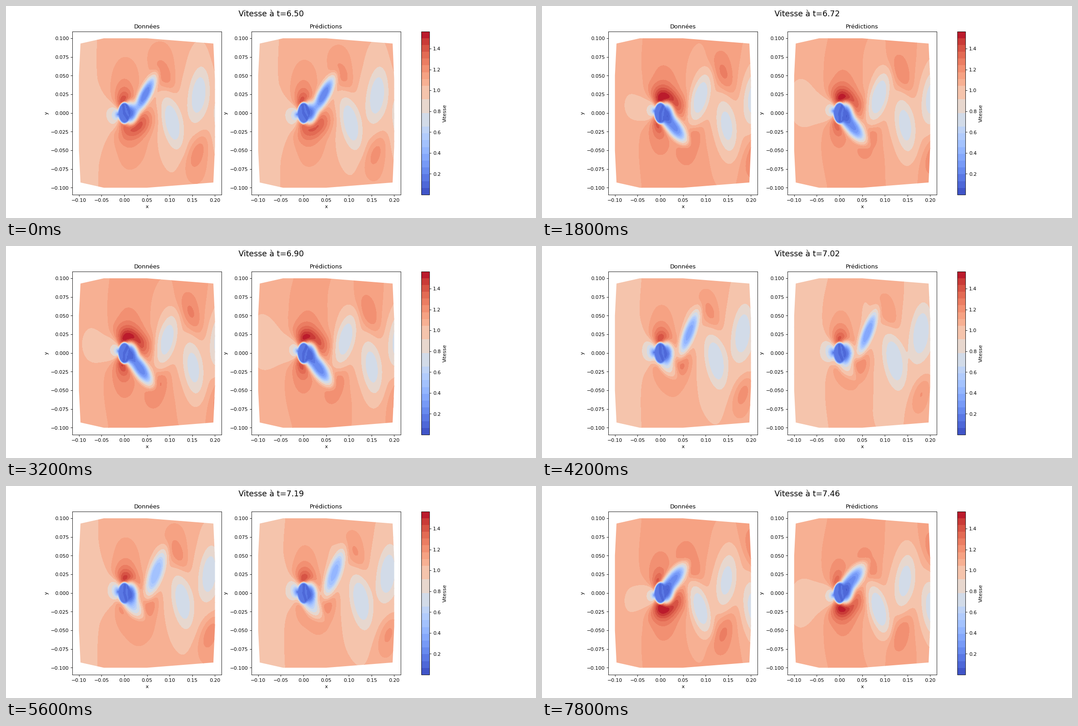
Write a matplotlib script that moves like this. It is 1183 px wide and 473 px high and loops after 8000 ms.

```python
import numpy as np
import matplotlib.pyplot as plt
from matplotlib.animation import FuncAnimation
from matplotlib.cm import ScalarMappable
from matplotlib.colors import BoundaryNorm, ListedColormap
from matplotlib.patches import Polygon

DPI = 78.87            # 15 x 6 inches gives 1183 x 473 pixels
FRAMES, INTERVAL = 40, 200
PERIOD = 6.67          # frames per shedding cycle
RADIUS = 0.0145        # cylinder
BANDS, VMAX = 24, 1.5656

LEVELS = np.linspace(0, VMAX, BANDS + 1)
X, Y = np.meshgrid(np.linspace(-0.102, 0.202, 200), np.linspace(-0.102, 0.102, 200))
R = np.hypot(X / 0.95, Y)

UPPER = [(-0.1, 0.05), (-0.0965, 0.093), (-0.045, 0.1),
         (0.05, 0.1), (0.1965, 0.093), (0.2, 0.045)]
HULL = UPPER + [(x, -y) for x, y in reversed(UPPER)]


def sigmoid(v):
    return 1 / (1 + np.exp(-np.clip(v, -50, 50)))


def bump(y, cx, cy, w, h, lean=0, power=1):
    """Leaning bell; a higher power flattens its top."""
    dy = y - cy
    q = ((X - cx - lean * dy) / w) ** 2 + (dy / h) ** 2
    return np.exp(-q ** power)


def slow_patch(age):
    """Slow fluid of given age (in cycles): x, y, depth, width, height, lean."""
    x = 0.046 + 0.118 * age
    y = 0.018 + 0.009 * np.cos(2 * np.pi * (age - 0.12))
    depth = sigmoid((age + 0.33) / 0.06) * (0.25 + 0.6 * sigmoid((0.2 - age) / 0.07))
    width = 0.022 - 0.009 * np.exp(-((age - 0.08) / 0.15) ** 2)
    height = 0.022 + 0.014 * sigmoid((age - 0.15) / 0.1)
    lean = 0.1 + 0.9 * np.exp(-max(age + 0.15, 0) / 0.45)
    return x, y, depth, width, height, lean


def fast_patch(age):
    """Fast fluid: it swells over the cylinder, then drifts off downstream."""
    swell = np.exp(-((age + 0.62) / 0.2) ** 2)
    x = 0.0295 * np.log1p(np.exp((age + 0.6) / 0.2))
    y = 0.016 + 0.034 * sigmoid((age + 0.16) / 0.06)
    depth = sigmoid((age + 1.15) / 0.04) * (0.13 + 0.22 * swell)
    width = 0.021 + 0.012 * swell
    height = 0.018 + 0.008 * sigmoid((age + 0.1) / 0.08)
    lean = -0.55 * sigmoid((age + 0.85) / 0.08) - 0.3 * swell
    return x, y, depth, width, height, lean


def street(patch, phase):
    """Yield every patch of both sides; the lower side lags half a cycle."""
    for y, shift in ((Y, 0), (-Y, 0.5)):
        for k in range(-2, 2):
            yield y, patch((phase + shift) % 1 + k)


def around_cylinder(phase):
    """Change of speed from potential flow, with a swaying stagnation point."""
    sway = 0.2 * np.cos(2 * np.pi * (phase - 0.35))
    z = X + 1j * Y
    z = z * np.maximum(1, RADIUS / np.maximum(np.abs(z), 1e-6))
    change = np.abs(1 - (RADIUS / (z * np.exp(1j * sway))) ** 2) - 1
    return np.where(change < 0, change * sigmoid(-X / 0.005), 0.35 * change)


def core(phase):
    """Faceted low values inside the cylinder."""
    turn = 0.5 * np.cos(2 * np.pi * phase)
    u = (X * np.cos(turn) + Y * np.sin(turn)) / RADIUS
    v = (Y * np.cos(turn) - X * np.sin(turn)) / RADIUS
    return 0.11 + 0.09 * np.abs(u - 0.3 * np.abs(v)) * (u < 0.5)


def speed(phase, offset=0, gain=1):
    pulse = np.cos(4 * np.pi * (phase - 0.35))
    field = 1.09 + offset + 0.035 * pulse - 0.053 * sigmoid(-(X + 0.045) / 0.014)
    field = field - 0.055 * np.exp(-(Y / 0.05) ** 2) * sigmoid((X - 0.075) / 0.01)
    field = field + around_cylinder(phase)

    for y, (cx, cy, d, w, h, lean) in street(fast_patch, phase):
        field += gain * d * bump(y, cx, cy, w, h, lean)
        field += 0.06 * min(1, d / 0.1) * bump(y, cx, cy + 0.018, 0.036, 0.038, lean / 2)

    field *= 1 - 0.88 * bump(Y, 0.011, 0, 0.0185, 0.0145, 0, 1.6)
    for y, (cx, cy, d, w, h, lean) in street(slow_patch, phase):
        grown = sigmoid((cx - 0.075) / 0.01)
        field *= 1 - d * bump(y, cx, cy, w, h, lean, 1.6)
        field *= 1 - 0.085 * grown * bump(y, cx, cy + 0.015, 0.036, 0.06, lean / 2)

    edge = np.clip((R - 0.0125) / 0.004, 0, 1)
    edge = edge * edge * (3 - 2 * edge)
    field = core(phase) * (1 - edge) + field * edge
    return np.clip(field, 0.03, VMAX - 0.005)


def band_colors():
    """One colour per band; the pale middle bands are paired."""
    cmap = plt.colormaps["coolwarm"]
    mids = [(k // 2 * 2 + 1 if 10 <= k < 16 else k + 0.5) / BANDS for k in range(BANDS)]
    return [cmap(m) for m in mids]


COLORS = band_colors()
LIMITS = dict(xlim=(-0.1147, 0.2147), ylim=(-0.1093, 0.1093))
fig, axes = plt.subplots(1, 2, figsize=(15, 6), dpi=DPI)
for ax, name in zip(axes, ("Données", "Prédictions")):
    ax.set(xlabel="x", ylabel="y", title=name, **LIMITS)

scale = ScalarMappable(BoundaryNorm(LEVELS, BANDS), ListedColormap(COLORS))
bar = fig.colorbar(scale, ax=axes, label="Vitesse")
ticks = np.arange(1, 8) * 0.2
bar.set_ticks(ticks, labels=[f"{v:.1f}" for v in ticks])
bar.minorticks_off()
heading = fig.suptitle("", fontsize=16)
shown = []


def draw(i):
    while shown:
        shown.pop().remove()
    heading.set_text(f"Vitesse à t={6.5 + i * 2 / 81:.2f}")
    phase = i / PERIOD
    fields = (speed(phase), speed(phase - 0.015, -0.012, 0.9))
    for ax, field in zip(axes, fields):
        filled = ax.contourf(X, Y, field, levels=LEVELS, colors=COLORS)
        filled.set_clip_path(Polygon(HULL, transform=ax.transData))
        ax.set(**LIMITS)
        shown.append(filled)
    return shown + [heading]


anim = FuncAnimation(fig, draw, frames=FRAMES, interval=INTERVAL,
                     init_func=lambda: draw(0), repeat=True, repeat_delay=0, blit=False)
plt.show()
```
